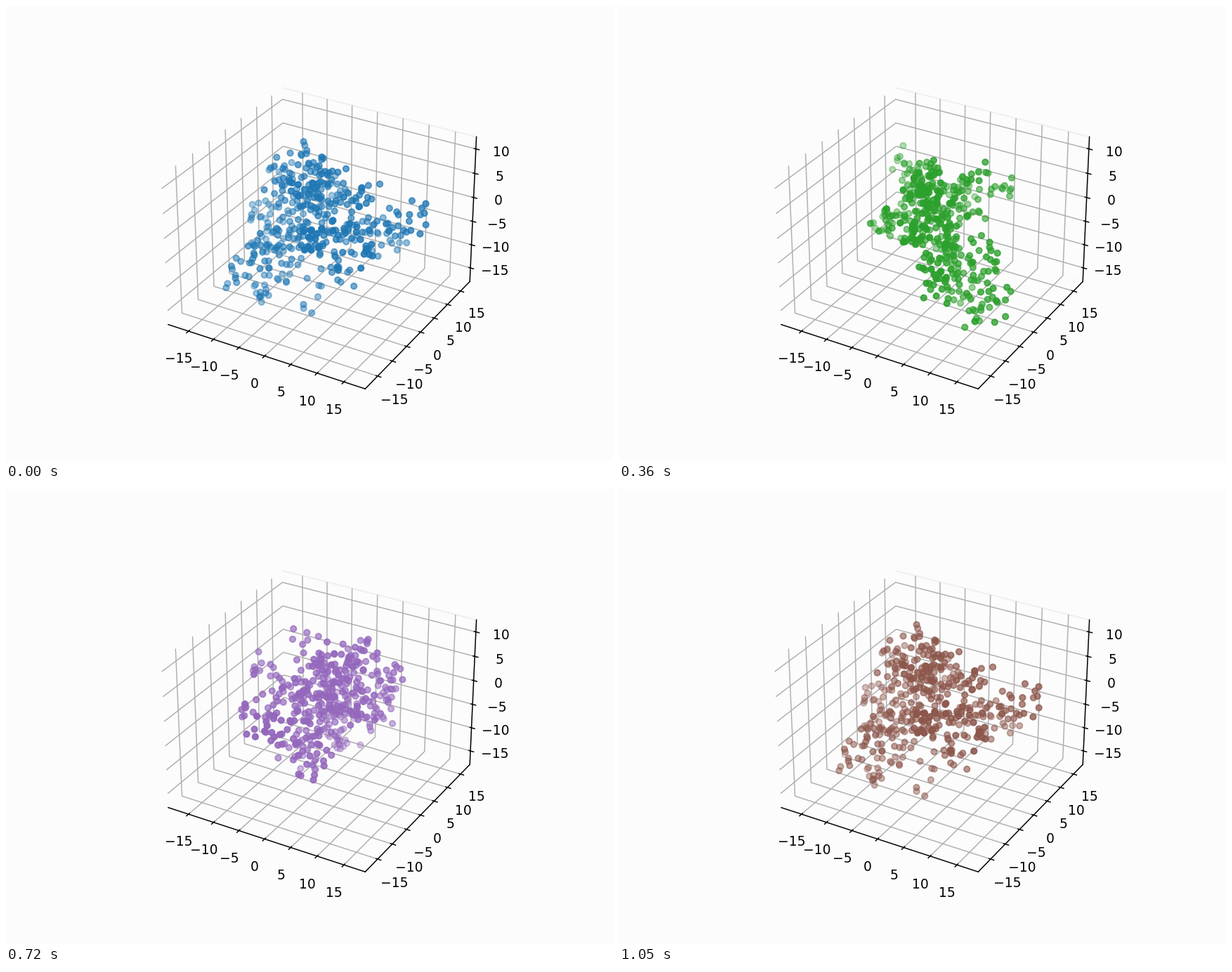
These frames come from a looping animation (864 by 648 pixels, 1080 ms). A matplotlib script:

```python
import numpy as np
import matplotlib.pyplot as plt
from matplotlib.animation import FuncAnimation

FRAMES = 36
COUNT = 430
PAPER = "#fcfcfc"

# Ends of the lobes that grow out of the middle of the cloud.
TIPS = np.array([
    (16, 4.5, 2), (9.6, 8.4, -7.3), (8.2, 3.2, 6.2),        # long arm
    (12.4, -5.5, 0), (4.3, -11.4, 3.2),                     # side
    (5, -2.8, -9.8), (0, -4, -16),                          # foot
    (-10, -7, -16.8), (-12.5, -10.4, -11.3), (-9, -9.7, -4),  # tail
    (-12.5, 0, -8.8), (-13.8, 1, -3.8), (-10, -2.4, 6.2),   # back
    (-12, 5, 4.2), (-2.4, 11, 1),
    (-6, 3.4, 10.7), (0, 1, 10.5), (-1, -7.4, 9.7),         # crown
])


def make_cloud(rng):
    """Scatter points along spokes from the middle to each tip."""
    reach = np.linalg.norm(TIPS, axis=1)
    spoke = rng.choice(len(TIPS), COUNT, p=reach / reach.sum())
    t = rng.random((COUNT, 1)) ** 0.5
    spread = 2.1 - 0.9 * t
    pts = t * TIPS[spoke] + spread * rng.normal(size=(COUNT, 3))
    pts[:, 2] = pts[:, 2].clip(-17.4, 11.8)
    return pts.T


def turn(pts, i):
    """Spin the cloud about z; the last step closes the full circle."""
    a = 2 * np.pi * i / (FRAMES - 1)
    x, y, z = pts
    return x * np.cos(a) - y * np.sin(a), x * np.sin(a) + y * np.cos(a), z


fig = plt.figure(figsize=(6.4, 4.8), dpi=135, facecolor=PAPER)
ax = fig.add_subplot(projection="3d", facecolor=PAPER)
ax.set(xlim=(-19.1, 18.92), ylim=(-19.15, 18.65), zlim=(-17.98, 12.43))
ax.set_xticks(range(-15, 16, 5))
ax.set_yticks(range(-15, 16, 5))
ax.set_zticks(range(-15, 11, 5))
for axis in (ax.xaxis, ax.yaxis, ax.zaxis):
    axis.set_pane_color(PAPER)
ax.yaxis.pane.set_edgecolor("#efefef")

cloud = make_cloud(np.random.default_rng(12))


def draw(i):
    for old in list(ax.collections):
        old.remove()
    return [ax.scatter(*turn(cloud, i), color=f"C{i % 10}")]


anim = FuncAnimation(fig, draw, frames=FRAMES, interval=30, repeat=True)
plt.show()
```
